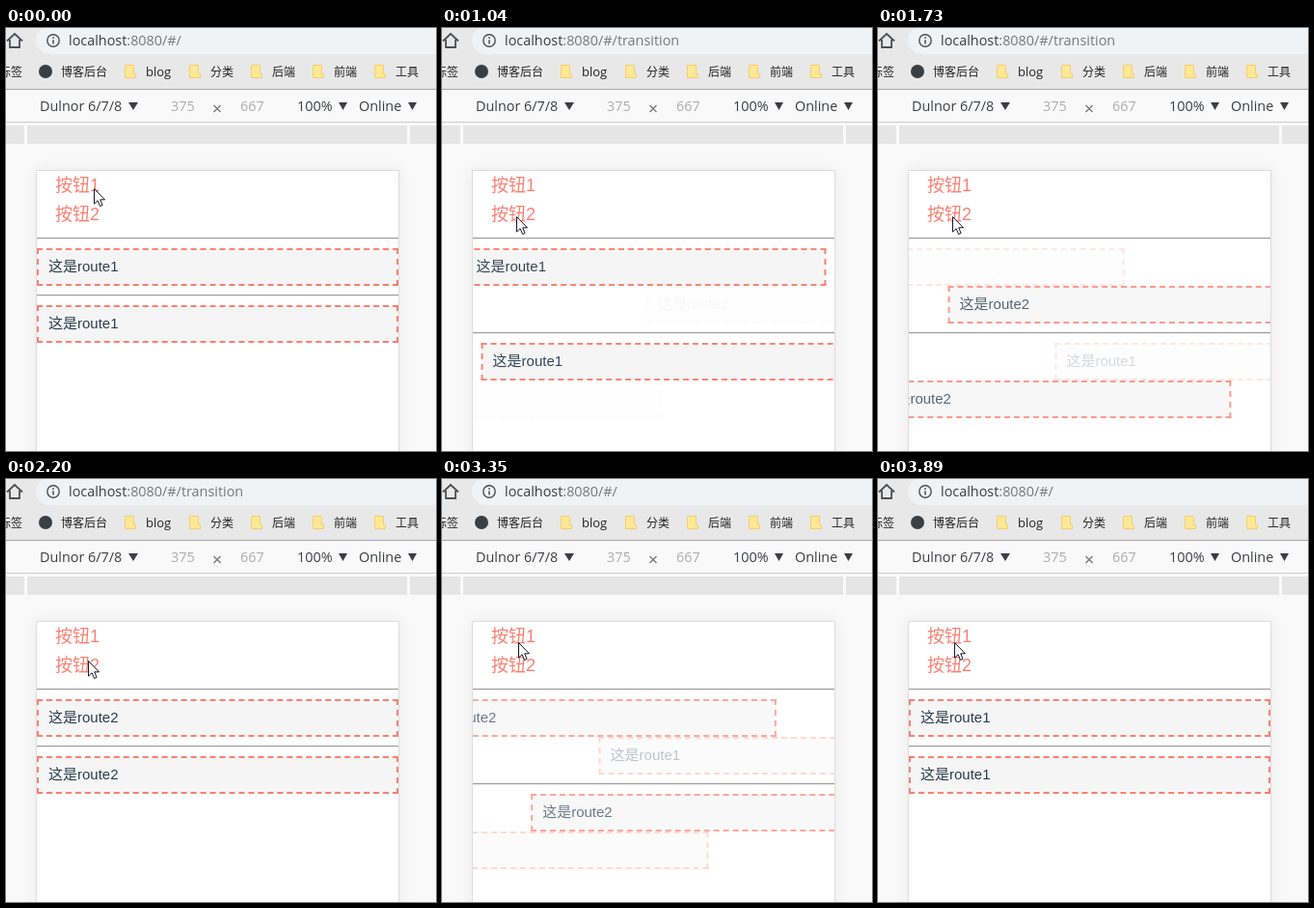
Animation of 446 by 438 pixels, one loop 4.27 s. Source, as an HTML page:

```html
<!DOCTYPE html>
<html lang="zh-CN">
<head>
<meta charset="utf-8">
<title>Route transition</title>
<style>
  html, body { margin: 0; width: 100%; height: 100%; overflow: hidden; background: #f9f9f9; }
  #stage { position: relative; width: 446px; height: 438px; overflow: hidden; }
  #stage > svg { position: absolute; left: 0; top: 0; }
  .ui { font-family: "Open Sans", "Noto Sans CJK SC", "Noto Sans CJK", sans-serif; font-size: 14.4px; fill: #3a3e42; }
  .ui .muted { fill: #adadad; }
  .ui .path { fill: #74797e; }
  .marks { font-size: 12px; fill: #222; }
  #phone {
    position: absolute; left: 32px; top: 148px; width: 375px; height: 300px;
    background: #fff; overflow: hidden;
    font: 15px/34px "Liberation Sans", "Noto Sans CJK SC", "Noto Sans CJK", sans-serif; color: #2c3e50;
  }
  #frame {
    position: absolute; left: 31px; top: 147px; width: 377px; height: 310px;
    background: #dedede; box-shadow: 0 0 14px rgba(0, 0, 0, .07);
  }
  .button { position: absolute; left: 19px; font-size: 18px; line-height: 31px; color: #fa8072; white-space: nowrap; }
  .rule { position: absolute; left: 0; width: 375px; height: 1px; background: #9a9a9a; border-bottom: 1px solid #eee; }
  .route {
    position: absolute; left: 0; box-sizing: border-box; width: 375px; height: 39px;
    padding: 0 10px; border: 2px dashed #fa8072; background: #f5f5f5; white-space: nowrap;
  }
</style>
</head>
<body>
<div id="stage">
  <div id="frame"></div>
  <svg class="ui" width="446" height="438">
    <rect width="446" height="64" fill="#e8e8e8"/>
    <rect x="31" y="-1" width="440" height="28" rx="14" fill="#eff3f5"/>
    <path d="M1 13.5 9 6l8 7.5M4 12v8h10v-8" fill="none" stroke="#4c5054" stroke-width="1.8"/>
    <circle cx="49" cy="13" r="6.2" fill="none" stroke="#4c5054" stroke-width="1.4"/>
    <path d="M49 9.3v1.6M49 12.2v4.4" stroke="#4c5054" stroke-width="1.5"/>
    <text x="65" y="18">localhost<tspan class="path" id="path"></tspan></text>

    <g class="marks" id="marks">
      <text x="-7" y="49.5">标签</text>
      <circle cx="41" cy="45" r="7" fill="#3a3f44"/>
      <text x="57" y="49.5">博客后台</text>
    </g>

    <rect y="64" width="446" height="34" fill="#f9f9f9"/>
    <path d="M0 63.5h446" stroke="#a8a8a8"/>
    <path d="M0 97.5h446" stroke="#cdcdcd"/>
    <text x="35" y="86">Dulnor 6/7/8</text>
    <text x="171" y="86" class="muted">375</text>
    <path d="m215.5 80 7 7m0-7-7 7" stroke="#777" stroke-width="1.3"/>
    <text x="243" y="86" class="muted">667</text>
    <text x="302" y="86">100%</text>
    <text x="366" y="86">Online</text>
    <path d="M127 77h10l-5 8zM345 77h9l-4.5 8zM417 77h9l-4.5 8z"/>
    <path d="M0 101h19v19H0zM22 101h394v19H22zM419 101h27v19h-27z" fill="#e5e5e5"/>
  </svg>

  <div id="phone">
    <div class="button" style="top:0">按钮1</div>
    <div class="button" style="top:30px">按钮2</div>
    <div class="rule" style="top:69px"></div>
    <div class="rule" id="divider"></div>
  </div>

  <svg width="446" height="438">
    <g id="cursor">
      <circle id="click" r="12" fill="#ff0" fill-opacity=".5"/>
      <path d="M.5.5v15.6l3.6-3.4 2.5 5.8 2.5-1.1-2.4-5.6h4.8z" fill="#fff" stroke="#15152b"/>
    </g>
  </svg>
</div>
<script>
const LOOP = 4270, DURATION = 1000, ENTER_LAG = 16;
const SHIFT = 187.5, TOP = 80, BOX = 39, GAP = 20;
const $ = id => document.getElementById(id);

// Screen refresh times, evenly spread over each burst of activity.
const burst = (from, to, count) => Array.from({ length: count },
  (_, i) => Math.round((from + (to - from) * i / (count - 1)) / 10) * 10);
const ticks = [0, ...burst(70, 310, 4), 710, ...burst(860, 1340, 7), ...burst(1420, 1880, 7),
  ...burst(2200, 2660, 7), ...burst(2810, 3270, 7), ...burst(3350, 3810, 7), 3890];

const switches = [
  { start: 851, from: 'route1', to: 'route2' },
  { start: 2845, from: 'route2', to: 'route1' }
];

// [time, x, y] of the pointer tip
const pointer = [
  [0, 91, 166], [70, 90, 170], [150, 86, 180], [230, 80, 190], [310, 77, 195],
  [2200, 85, 188], [2280, 90, 183], [2350, 92, 179], [2430, 91, 175],
  [2510, 87, 171], [2580, 82, 169], [2660, 79, 169]
];

// cubic-bezier(.42, 0, 1, 1)
function easeIn(t) {
  if (t <= 0) return 0;
  if (t >= 1) return 1;
  let lo = 0, hi = 1, s;
  const tail = u => 3 * (1 - u) * u * u + u ** 3;
  for (let i = 0; i < 24; i++) {
    s = (lo + hi) / 2;
    if (1.26 * (1 - s) ** 2 * s + tail(s) < t) lo = s; else hi = s;
  }
  return tail(s);
}

function addRoute() {
  const el = document.createElement('div');
  el.className = 'route';
  return $('phone').appendChild(el);
}

// Each view slides its own way: the upper one leftwards, the lower one rightwards.
const views = [-1, 1].map(direction => ({ direction, current: addRoute(), entering: addRoute() }));

function place(el, route, top, x, opacity) {
  el.textContent = '这是' + route;
  el.style.top = top + 'px';
  el.style.transform = x ? `translateX(${x}px)` : 'none';
  el.style.opacity = opacity;
}

function drawRoutes(now) {
  const last = switches.filter(s => now >= s.start).pop();
  const moving = last && now < last.start + DURATION;
  const route = !last ? 'route1' : moving ? last.from : last.to;
  const leave = moving ? easeIn((now - last.start) / DURATION) : 0;
  const enter = moving ? easeIn((now - last.start - ENTER_LAG) / DURATION) : 0;
  const height = moving ? 2 * BOX : BOX;

  views.forEach(({ direction, current, entering }, i) => {
    const top = TOP + i * (height + GAP);
    place(current, route, top, direction * SHIFT * leave, 1 - leave);
    entering.style.display = moving ? '' : 'none';
    if (moving) place(entering, last.to, top + BOX, -direction * SHIFT * (1 - enter), enter);
  });
  $('divider').style.top = TOP + height + 9 + 'px';
  $('path').textContent = ':8080/#/' + (last && last.to === 'route2' ? 'transition' : '');
}

function drawPointer(now) {
  const [, x, y] = pointer.filter(p => p[0] <= now).pop();
  $('cursor').setAttribute('transform', `translate(${x} ${y})`);
  $('click').style.display = now === 710 || now === 2810 ? '' : 'none';
}

function addFolders() {
  ['blog', '分类', '后端', '前端', '工具'].forEach((name, i) => {
    const x = i ? 126 + 64 * i : 123;
    const size = i ? 12 : 13;
    $('marks').insertAdjacentHTML('beforeend',
      `<path d="M${x + .5} 38.5h9v9h2v4h-11z" fill="#ffe794" stroke="#f0d070"/>
       <text x="${x + 22}" y="49.5" font-size="${size}">${name}</text>`);
  });
}

let shown = -1;
const origin = performance.now();
function render() {
  const time = Math.max(0, performance.now() - origin) % LOOP;
  const now = ticks.filter(t => t <= time).pop();
  if (now !== shown) {
    shown = now;
    drawRoutes(now);
    drawPointer(now);
  }
  requestAnimationFrame(render);
}

addFolders();
render();
</script>
</body>
</html>
```
